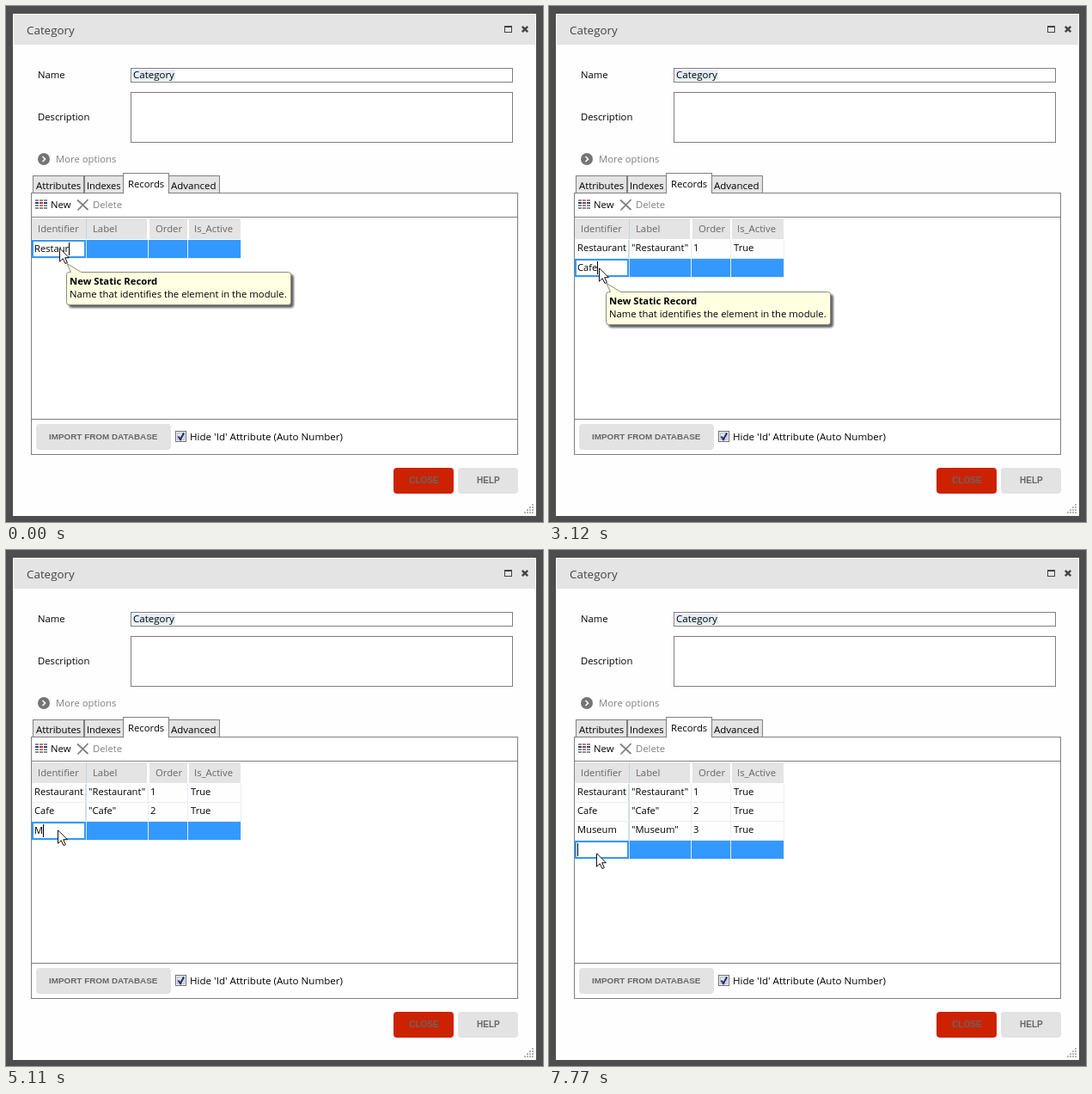
An HTML page for the animation above (8 s loop, 625 by 600 pixels).

```html
<!DOCTYPE html>
<html lang="en">
<head>
<meta charset="utf-8">
<title>Category records</title>
<style>
  html, body { margin: 0; width: 100%; height: 100%; overflow: hidden; background: #4d4d4d; }
  svg { display: block; width: 625px; height: 600px; }
  text { font: 11.3px "Open Sans", "Noto Sans", sans-serif; fill: #000; white-space: pre; }
  rect { shape-rendering: crispEdges; }
  .round { shape-rendering: auto; }
  .box { fill: #fff; stroke: #7f7f7f; }
  .tab { fill: #e4e4e4; stroke: #7f7f7f; }
  .title { font-size: 13.4px; fill: #444; }
  .grey { fill: #808080; }
  .head { fill: #666; }
  .cell { font-size: 11.2px; }
  .white { fill: #fff; }
  .bold { font-weight: 700; }
  .btn { font: bold 10px "Liberation Sans", Arial, sans-serif; fill: #666; }
  .off { stroke: #808080; }
  .off text { fill: #808080; }
  #del text { stroke: none; }
</style>
</head>
<body>
<svg viewBox="0 0 625 600">
  <defs>
    <filter id="blur" x="-5%" y="-20%" width="110%" height="150%"><feGaussianBlur stdDeviation="1.3"/></filter>
  </defs>

  <rect width="625" height="600" fill="#4d4d4d"/>
  <rect x="8" y="9" width="609" height="584" fill="#fefefe"/>
  <rect x="9" y="10" width="607" height="35" fill="#e4e4e4"/>
  <text class="title" x="24" y="33">Category</text>
  <rect x="580.5" y="23.5" width="8" height="7" fill="none" stroke="#444"/>
  <rect x="580" y="23" width="9" height="2" fill="#444"/>
  <path d="M600.8 23.8l6.4 6.4m0-6.4l-6.4 6.4" stroke="#444" stroke-width="2.4"/>

  <text x="37" y="84">Name</text>
  <rect class="box" x="145.5" y="72.5" width="444" height="16"/>
  <rect x="147" y="74" width="50" height="13" fill="#e6eff8"/>
  <text x="148" y="84" style="font-size:11.5px">Category</text>
  <text x="37" y="133">Description</text>
  <rect class="box" x="145.5" y="100.5" width="444" height="58"/>
  <circle cx="44" cy="178" r="7" fill="#747474"/>
  <path d="M42.5 175l3 3-3 3" fill="none" stroke="#fff" stroke-width="1.6"/>
  <text class="grey" x="58" y="182">More options</text>

  <rect class="tab" x="31.5" y="197.5" width="59" height="20"/>
  <rect class="tab" x="91.5" y="197.5" width="45" height="20"/>
  <rect class="tab" x="189.5" y="197.5" width="59" height="20"/>
  <rect class="box" x="29.5" y="217.5" width="566" height="304"/>
  <rect class="box" x="136.5" y="194.5" width="53" height="23"/>
  <rect x="137" y="217" width="52" height="2" fill="#fff"/>
  <text x="35" y="213">Attributes</text>
  <text x="94" y="213" style="font-size:11px">Indexes</text>
  <text x="142" y="211">Records</text>
  <text x="192" y="213" style="font-size:11.5px">Advanced</text>
  <path d="M30 245.5H595M30 480.5H595" stroke="#7f7f7f"/>

  <g id="newIcon"></g>
  <text x="52" y="235">New</text>
  <g id="del" stroke="#000">
    <path d="M83 225.5L95.5 237M95.5 225L83.500 237.500" stroke-width="1.8"/>
    <text x="101" y="235">Delete</text>
  </g>

  <rect class="round" x="35" y="486" width="157" height="30" rx="4" fill="#e3e3e3"/>
  <text class="btn" x="50" y="504" style="font-size:9.9px">IMPORT FROM DATABASE</text>
  <rect x="197.500" y="494.500" width="12" height="12" fill="#f4f4f4" stroke="#707070"/>
  <rect x="199.500" y="496.500" width="8" height="8" fill="#dfe5ee" stroke="#b5bcc8"/>
  <path d="M200.500 500.500l2.500 3.500 4-7.500" fill="none" stroke="#1c2c6c" stroke-width="2"/>
  <text x="214" y="505" style="font-size:11.6px">Hide 'Id' Attribute (Auto Number)</text>
  <rect class="round" x="451" y="537" width="70" height="30" rx="4" fill="#cc2200"/>
  <text class="btn white" x="469" y="555" style="font-size:10.1px">CLOSE</text>
  <rect class="round" x="526" y="537" width="70" height="30" rx="4" fill="#e3e3e3"/>
  <text class="btn" x="548" y="555">HELP</text>
  <g id="grip"></g>

  <g id="grid"></g>
  <g id="tip">
    <rect class="round" x="3" y="3" width="262" height="39" rx="4" fill="#000" opacity=".6" filter="url(#blur)"/>
    <path d="M3.500.500H5.500L1-9.500 17.500.500H258.500q3 0 3 3V35.500q0 3-3 3H3.500q-3 0-3-3V3.500q0-3 3-3z" fill="#ffffe1" stroke="#8a8a80"/>
    <text class="bold" x="4" y="15">New Static Record</text>
    <text x="4" y="30">Name that identifies the element in the module.</text>
  </g>
  <path id="cursor" d="M.500.800V16.200L4.200 12.700 7 18.500 9.400 17.400 6.700 11.700H11.400z" fill="#fff" stroke="#111"/>
</svg>

<script>
const LOOP = 8000, ROW_TOP = 272, PITCH = 22;
const NAMES = ['Restaurant', 'Cafe', 'Museum'];
const COLS = [[30, 63], [94, 71], [166, 45], [212, 61]];
const HEADS = [['Identifier', 37], ['Label', 101], ['Order', 174], ['Is_Active', 219]];
const BLUE = '#3399ff', HOVER = '#73b5ff';
const $ = id => document.getElementById(id);

const rect = (x, y, w, h, fill) =>
  `<rect x="${x}" y="${y}" width="${w}" height="${h}" fill="${fill}"/>`;
const label = (s, x, y, cls) => `<text class="${cls}" x="${x}" y="${y}">${s}</text>`;
const edit = row => ({ edit: row, text: '', tx: 33, caret: 1, hover: -1 });

// Each step changes part of the state at its time (ms).
const STEPS = [
  [0, { rows: 0, ...edit(0), text: 'Restaur', tip: 1, del: 0, cur: [62, 281] }],
  [60, { text: 'Restaura' }],
  [110, { text: 'Restauran' }],
  [290, { text: 'estaurant', tx: 31 }],
  [790, { caret: 0 }],
  [1090, { tip: .5 }],
  [1150, { tip: 0, del: 1 }],
  [1580, { rows: 1 }],
  [1650, { cur: [61, 287] }],
  [1720, { cur: [60, 294], hover: 1 }],
  [1790, { cur: [58, 301] }],
  [1860, { cur: [58, 304] }],
  [1930, edit(1)],
  [2000, { del: 0 }],
  [2490, { caret: 0 }],
  [2590, { tip: .5 }],
  [2650, { tip: 1 }],
  [2760, { text: 'C', caret: 1 }],
  [2880, { text: 'Ca' }],
  [3060, { text: 'Caf' }],
  [3120, { text: 'Cafe' }],
  [3620, { caret: 0 }],
  [3680, { tip: .5 }],
  [3740, { tip: 0, del: 1 }],
  [3790, { rows: 2 }],
  [3830, { cur: [58, 314] }],
  [3870, { cur: [56, 326], hover: 2 }],
  [3910, { cur: [55, 335], caret: 1 }],
  [3960, { cur: [57, 332] }],
  [4030, edit(2)],
  [4100, { cur: [59, 328], del: 0 }],
  [4160, { cur: [60, 325] }],
  [4330, { tip: .5 }],
  [4390, { tip: 1 }],
  [4500, { tip: .5 }],
  [4560, { tip: 0 }],
  [4920, { caret: 0 }],
  [5110, { text: 'M', caret: 1 }],
  [5350, { text: 'Mu' }],
  [5410, { tip: .5 }],
  [5460, { tip: 1 }],
  [5520, { text: 'Mus' }],
  [5770, { text: 'Muse' }],
  [5950, { text: 'Museu' }],
  [6200, { text: 'Museum' }],
  [6690, { caret: 0 }],
  [6940, { tip: .6 }],
  [7000, { tip: .2 }],
  [7050, { tip: 0, del: 1 }],
  [7230, { rows: 3 }],
  [7300, { cur: [59, 331] }],
  [7380, { cur: [58, 338] }],
  [7460, { cur: [56, 346], hover: 3 }],
  [7540, { cur: [55, 352] }],
  [7620, edit(3)],
  [7700, { del: 0 }]
];

function header() {
  return COLS.map(([x, w], i) =>
    rect(i ? x + (i > 1) : x, 247, w - (i ? 1 : 0), 24, '#e4e4e4') +
    label(HEADS[i][0], HEADS[i][1], 263, 'head')).join('') + rect(93, 247, 1, 24, '#c3d3e4');
}

function row(s, i) {
  const y = ROW_TOP + PITCH * i, active = i === s.edit;
  const fill = active ? BLUE : i === s.hover ? HOVER : '#fefefe';
  const cls = active ? 'cell white' : 'cell';
  let out = rect(30, y, 243, 21, fill) + rect(30, y + 21, 244, 1, '#ededed');
  for (const x of [165, 211, 273]) out += rect(x, y, 1, 21, '#e9edf2');
  out += rect(92, y, 2, 21, '#cfdfee');
  if (i < s.rows) {
    if (!active) out += label(NAMES[i], 33, y + 13, cls);
    out += label(`"${NAMES[i]}"`, 96, y + 13, cls) +
      label(i + 1, 168, y + 13, cls) + label('True', 215, y + 13, cls);
  }
  if (active) {
    out += rect(30, y, 63, 21, BLUE) + rect(32, y + 2, 59, 17, '#fff') +
      `<text id="input" class="cell" x="${s.tx}" y="${y + 14}">${s.text}</text>`;
  }
  return out;
}

function draw(s) {
  let out = header();
  for (let i = 0; i <= Math.max(s.rows, s.edit); i++) out += row(s, i);
  const grid = $('grid');
  grid.innerHTML = out;
  if (s.caret) {
    const x = Math.floor(s.tx + .5 + (s.text && $('input').getComputedTextLength()));
    grid.insertAdjacentHTML('beforeend', rect(x, ROW_TOP + PITCH * s.edit + 3, 1, 15, '#000'));
  }
  const [x, y] = s.cur;
  $('cursor').setAttribute('transform', `translate(${x} ${y})`);
  $('tip').setAttribute('transform', `translate(${x + 8} ${y + 28})`);
  $('tip').setAttribute('opacity', s.tip);
  $('del').setAttribute('class', s.del ? '' : 'off');
}

function drawIcons() {
  let icon = '', grip = '';
  for (let r = 0; r < 4; r++)
    for (let c = 0; c < 3; c++)
      icon += rect(34 + 5 * c, 225 + 3 * r, 4, 2, r !== 1 ? '#8a8a8a' : c === 1 ? '#d42a1c' : '#24408e');
  for (let r = 0; r < 4; r++)
    for (let c = 0; c <= r; c++)
      grip += rect(612 - 3 * c, 579 + 3 * r, 2, 2, '#b4b4b4');
  $('newIcon').innerHTML = icon;
  $('grip').innerHTML = grip;
}

const start = performance.now();
let shown = -1;

function tick() {
  const t = (performance.now() - start) % LOOP;
  const past = STEPS.filter(([at]) => at <= t);
  if (past.length !== shown) {
    shown = past.length;
    draw(Object.assign({}, ...past.map(([, change]) => change)));
  }
  requestAnimationFrame(tick);
}

drawIcons();
tick();
</script>
</body>
</html>
```
